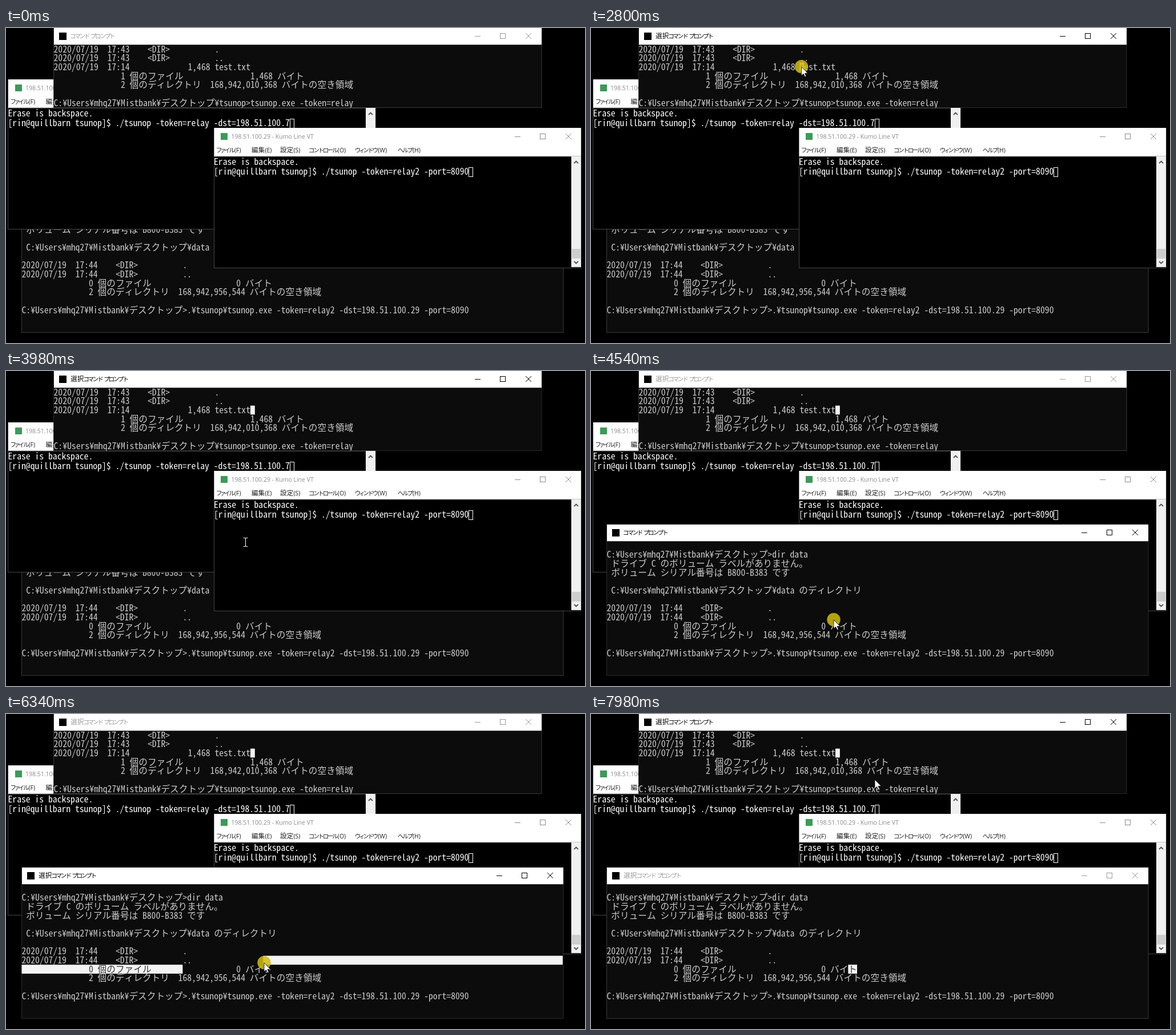
An HTML page with a canvas that plays this animation: 1014x552 px, repeating every 8000 ms.

```html
<!DOCTYPE html>
<html lang="ja">
<head>
<meta charset="utf-8">
<title>Terminals</title>
<style>
html, body { margin: 0; width: 100%; height: 100%; overflow: hidden; background: #000; }
canvas { display: block; width: 1014px; height: 552px; }
</style>
</head>
<body>
<canvas id="stage" width="1014" height="552"></canvas>
<script>
const ctx = document.getElementById('stage').getContext('2d');
const LOOP = 8000, CELL = 7.83, ROW = 15.67;
const MONO = '"Noto Sans Mono CJK JP", "Noto Sans Mono", monospace';
const CJK = '"Noto Sans CJK JP", "Noto Sans CJK", sans-serif';
const UI = '"Open Sans", "Noto Sans", sans-serif';

ctx.font = '300 100px ' + MONO;
const HALF_FONT = `300 ${CELL * 100 / ctx.measureText('0').width}px ${MONO}`;
const FULL_FONT = `300 ${CELL * 2}px ${CJK}`;

const HOME = 'C:¥Users¥mhq27¥Mistbank¥デスクトップ';
const PROMPT = '[rin@quillbarn tsunop]$ ./tsunop ';
const sp = n => ' '.repeat(n);
const dirLine = (time, name) => `2020/07/19  ${time}    <DIR>${sp(10)}${name}`;

const winA = {
  x: 83.5, y: 0, r: 938, b: 139.5, top: 29.3, cols: 109,
  lines: [
    dirLine('17:43', '.'),
    dirLine('17:43', '..'),
    `2020/07/19  17:14${sp(13)}1,468 test.txt`,
    `${sp(15)}1 個のファイル${sp(15)}1,468 バイト`,
    `${sp(15)}2 個のディレクトリ  168,942,010,368 バイトの空き領域`,
    '',
    HOME + '¥tsunop>tsunop.exe -token=relay'
  ]
};
const winD = {
  x: 27.5, y: 269, r: 976, b: 533.5, top: 298.3, cols: 121,
  lines: [
    '',
    HOME + '>dir data',
    ' ドライブ C のボリューム ラベルがありません。',
    ' ボリューム シリアル番号は B800-B383 です',
    '',
    ` ${HOME}¥data のディレクトリ`,
    '',
    dirLine('17:44', '.'),
    dirLine('17:44', '..'),
    `${sp(15)}0 個のファイル${sp(19)}0 バイト`,
    `${sp(15)}2 個のディレクトリ  168,942,956,544 バイトの空き領域`,
    '',
    HOME + '>.¥tsunop¥tsunop.exe -token=relay2 -dst=198.51.100.29 -port=8090'
  ]
};
const winB = {
  x: 3.5, y: 90, r: 647, b: 352.5, host: '198.51.100.7',
  cmd: PROMPT + '-token=relay -dst=198.51.100.7'
};
const winC = {
  x: 364, y: 175, r: 1007, b: 420, host: '198.51.100.29', thumb: true,
  cmd: PROMPT + '-token=relay2 -port=8090'
};

// Pointer moves: start, last step, number of steps, destination
const MOVES = [
  [449, 1000, 8, 361, 71], [1160, 1240, 2, 363.5, 69],
  [2330, 2410, 2, 367, 68], [2560, 2560, 1, 368.5, 68],
  [2960, 3430, 7, 435, 73], [3820, 3980, 3, 419.5, 300],
  [4060, 4140, 2, 424, 391], [4290, 4370, 2, 425, 436],
  [4690, 4850, 3, 324, 451], [5250, 5410, 3, 311.5, 446],
  [5480, 5560, 2, 308, 441], [6020, 6340, 5, 452, 436],
  [6420, 6500, 2, 459, 440.7], [7430, 7740, 5, 497, 115]
];
const PRESSES = [[1940, 2090], [2800, 3590], [3660, 3820], [4450, 4610],
  [5640, 6800], [7120, 7270], [7820, 7980]];
const SHOW = 370, FOCUS_A = 1940, RAISE_D = 4450, REFOCUS_A = 7820;

function pointerAt(t) {
  let x = 792, y = 446;
  for (const [t0, t1, n, tx, ty] of MOVES) {
    if (t < t0) break;
    const step = n > 1 ? (t1 - t0) / (n - 1) : 1;
    let p = Math.min(n, Math.floor((t - t0 + 2) / step) + 1) / n;
    if (n >= 5) p = p * p * (3 - 2 * p);
    x += (tx - x) * p;
    y += (ty - y) * p;
  }
  return { x, y };
}

function rect(x, y, w, h, color) {
  ctx.fillStyle = color;
  ctx.fillRect(x, y, w, h);
}

function stroke(color, width, ...paths) {
  ctx.strokeStyle = color;
  ctx.lineWidth = width;
  ctx.beginPath();
  for (const path of paths) path.forEach(([x, y], i) => i ? ctx.lineTo(x, y) : ctx.moveTo(x, y));
  ctx.stroke();
}

function frame(w, color) {
  ctx.strokeStyle = color;
  ctx.lineWidth = 1;
  const x = Math.floor(w.x), y = Math.floor(w.y);
  ctx.strokeRect(x + .5, y + .5, Math.floor(w.r) - x - .5, Math.floor(w.b) - y);
}

const isFull = ch => ch.charCodeAt(0) > 0x2e80;

// Text on a fixed grid of cells; isLit tells which cells are inverted
function gridText(text, x, top, color, isLit) {
  let col = 0;
  for (const ch of text) {
    const full = isFull(ch);
    if (ch !== ' ') {
      ctx.font = full ? FULL_FONT : HALF_FONT;
      ctx.fillStyle = isLit && isLit(col) ? '#333' : color;
      ctx.fillText(ch, x + col * CELL, top + 13.2);
    }
    col += full ? 2 : 1;
  }
}

// Interface text with proportional kana
function label(text, x, y, color) {
  ctx.fillStyle = color;
  for (const ch of text) {
    if (isFull(ch)) {
      const kana = /[ァ-ヺー]/.test(ch), small = /[ァィゥェォッ]/.test(ch);
      const adv = small ? 6 : kana ? 8.3 : 11.7;
      ctx.font = `${kana ? 10.6 : 11.5}px ${CJK}`;
      ctx.fillText(ch, x + (adv - ctx.measureText(ch).width) / 2, y + 4.2);
      x += adv;
    } else {
      ctx.font = `10.5px ${UI}`;
      ctx.fillText(ch, x, y + 4);
      x += ctx.measureText(ch).width;
    }
  }
}

function buttons(r, y, color) {
  stroke(color, 1,
    [[r - 117, y + .5], [r - 107, y + .5]],
    [[r - 28, y - 5], [r - 18, y + 5]],
    [[r - 18, y - 5], [r - 28, y + 5]]);
  ctx.strokeRect(Math.round(r - 73) + .5, y - 4.5, 9, 9);
}

function cellAt(w, p) {
  const row = Math.floor((p.y - w.top) / ROW);
  return { row, col: Math.floor((p.x - w.x) / CELL) };
}

// Widens a cell to the whole character that stands on it
function span(w, { row, col }) {
  let c = 0;
  for (const ch of w.lines[row] || '') {
    const n = isFull(ch) ? 2 : 1;
    if (col < c + n) return [row * w.cols + c, row * w.cols + c + n - 1];
    c += n;
  }
  return [row * w.cols + col, row * w.cols + col];
}

function selection(w, anchor, head) {
  const a = span(w, anchor), h = span(w, head);
  return [Math.min(a[0], h[0]), Math.max(a[1], h[1])];
}

function consoleWindow(w, active, sel) {
  rect(w.x, w.y, w.r - w.x, w.b - w.y, '#0c0c0c');
  frame(w, active ? '#2a2a2a' : '#3a3a3a');
  const left = Math.ceil(w.x), ink = active ? '#000' : '#999', mid = w.y + 14;
  rect(left, w.y, w.r - left, 29.3, '#fff');
  rect(left + 9, mid - 6, 13, 13, '#000');
  label((sel ? '選択' : '') + 'コマンド プロンプト', left + 29, mid, ink);
  buttons(w.r, mid, ink);

  ctx.save();
  ctx.beginPath();
  ctx.rect(w.x - 1, w.top, w.r - w.x + 1, w.b - w.top);
  ctx.clip();
  w.lines.forEach((text, row) => {
    const top = w.top + row * ROW, base = row * w.cols;
    if (sel) {
      const from = Math.max(0, sel[0] - base), to = Math.min(w.cols - 1, sel[1] - base);
      if (from <= to) rect(w.x + from * CELL, top, (to - from + 1) * CELL, ROW, '#f3f3f3');
    }
    gridText(text, w.x, top, '#ccc', sel && (c => base + c >= sel[0] && base + c <= sel[1]));
  });
  ctx.restore();
}

const MENU = [[5, 'ファイル(F)'], [66, '編集(E)'], [116, '設定(S)'],
  [167, 'コントロール(O)'], [248, 'ウィンドウ(W)'], [323, 'ヘルプ(H)']];

function chevron(x, y, dir) {
  stroke('#505050', 1.8, [[x - 3.5, y + 2 * dir], [x, y - 1.5 * dir], [x + 3.5, y + 2 * dir]]);
}

function remoteWindow(w) {
  const { x, y, r, b } = w, body = y + 51;
  rect(x, y, r - x, b - y, '#000');
  frame(w, '#444');
  rect(x + .5, y, r - x - .5, 50, '#fff');
  rect(x, y + 49.5, r - x, 1, '#8a8a8a');
  rect(Math.round(x + 12), y + 9, 12, 12, '#3c9a58');
  label(w.host + ' - Kumo Line VT', x + 30.5, y + 15, '#8a8a8a');
  buttons(r + 1, y + 15, '#8a8a8a');
  for (const [dx, text] of MENU) label(text, x + dx, y + 39, '#222');

  rect(r - 17, body - 1, 17, b - body, '#f0f0f0');
  chevron(r - 8.5, y + 60, 1);
  chevron(r - 8.5, b - 9, -1);
  if (w.thumb) rect(r - 16, b - 33, 15, 17, '#cdcdcd');

  gridText('Erase is backspace.', x, body + 1, '#fff');
  gridText(w.cmd, x, body + 17.8, '#fff');
  ctx.strokeStyle = '#fff';
  ctx.lineWidth = 1;
  ctx.strokeRect(Math.round(x + w.cmd.length * CELL) + .5, body + 18.5, 7, 16);
}

const inside = (p, x, y, r, b) => p.x >= x && p.x < r && p.y >= y && p.y < b;

function overRemote(p, raised) {
  if (raised && inside(p, winD.x, winD.y, winD.r, winD.b)) return false;
  if (inside(p, winC.x, winC.y, winC.r, winC.b)) return p.y > 226 && p.x < 990;
  return inside(p, winB.x, 141, 630, winB.b);
}

function drawPointer(p, beam) {
  ctx.save();
  ctx.translate(p.x, p.y);
  if (beam) {
    stroke('#e8e8e8', 1.2, [[0, -7], [0, 7]],
      [[-4, -7.5], [-1, -7.5], [0, -6.5], [1, -7.5], [4, -7.5]],
      [[-4, 7.5], [-1, 7.5], [0, 6.5], [1, 7.5], [4, 7.5]]);
  } else {
    ctx.beginPath();
    for (const [x, y] of [[0, 0], [0, 15.6], [3.6, 12.3], [6, 17.6], [8.3, 16.6], [6, 11.5], [11, 11.2]]) ctx.lineTo(x, y);
    ctx.closePath();
    ctx.fillStyle = '#fff';
    ctx.fill();
    ctx.strokeStyle = '#000';
    ctx.lineWidth = .8;
    ctx.stroke();
  }
  ctx.restore();
}

function draw(t) {
  const p = pointerAt(t), raised = t >= RAISE_D;
  const activeA = t >= FOCUS_A && t < RAISE_D || t >= REFOCUS_A;
  const activeD = raised && t < REFOCUS_A;

  let selA = null, selD = null;
  if (t >= 3660) selA = selection(winA, { row: 2, col: 44 }, { row: 2, col: 44 });
  else if (t >= 2800) selA = selection(winA, { row: 2, col: 36 }, cellAt(winA, p));
  if (t >= 7120) selD = selection(winD, { row: 9, col: 54 }, { row: 9, col: 54 });
  else if (t >= 5640) selD = selection(winD, { row: 9, col: 35 }, cellAt(winD, p));

  rect(0, 0, 1014, 552, '#000');
  if (!raised) consoleWindow(winD, false, null);
  remoteWindow(winB);
  consoleWindow(winA, activeA, selA);
  remoteWindow(winC);
  if (raised) consoleWindow(winD, activeD, selD);

  if (t < SHOW) return;
  if (PRESSES.some(([a, b]) => t >= a && t < b)) {
    ctx.fillStyle = 'rgba(208, 188, 16, .86)';
    ctx.beginPath();
    ctx.arc(p.x, p.y - .3, 11.7, 0, Math.PI * 2);
    ctx.fill();
  }
  drawPointer(p, overRemote(p, raised));
}

const start = performance.now();
function tick() {
  draw((performance.now() - start) % LOOP);
  requestAnimationFrame(tick);
}
tick();
</script>
</body>
</html>
```
